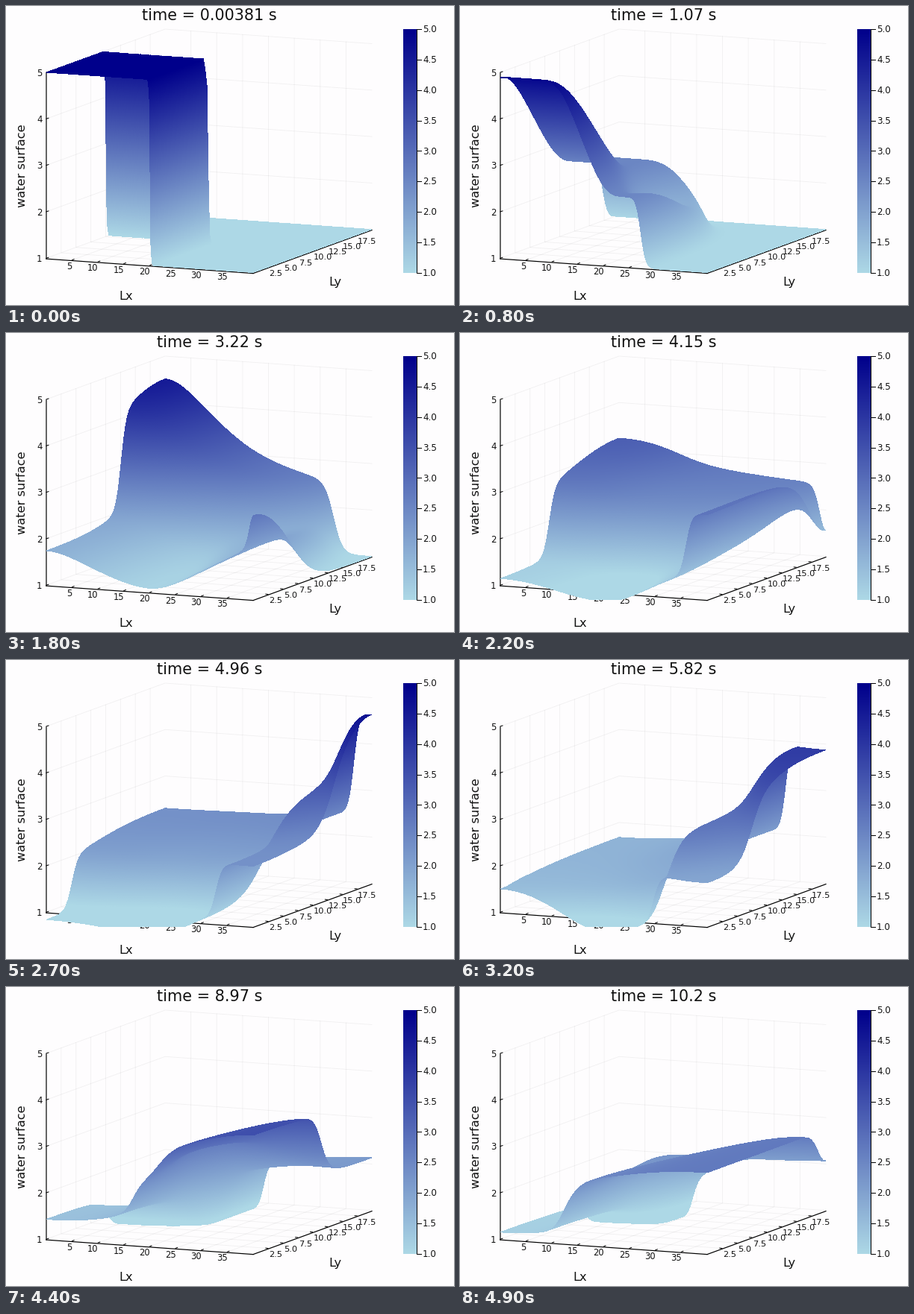
A matplotlib script that plays this animation: 600 by 401 pixels, repeating every 5000 ms.

```python
import numpy as np
import matplotlib.pyplot as plt
from matplotlib.animation import FuncAnimation
from matplotlib.colors import LinearSegmentedColormap

W, H, DPI = 600, 401, 64
PT = 72 / DPI
FRAMES, INTERVAL = 50, 100
LX, LY, CELL, CFL, G = 40, 20, 0.3125, 0.15, 9.81
CLIP_ROW = 358

plt.rcParams["font.family"] = "DejaVu Sans"
water = LinearSegmentedColormap.from_list("water", ["lightblue", "darkblue"], 512)


# --- shallow water: Lax-Friedrichs fluxes with one global speed, closed box ---
MIRROR = np.array([1, -1, 1])[:, None, None]


def max_speed(q):
    h, m, n = q
    return (np.maximum(np.abs(m), np.abs(n)) / h + np.sqrt(G * h)).max()


def flux_difference(q, speed):
    p = np.concatenate([q[:, :1] * MIRROR, q, q[:, -1:] * MIRROR], axis=1)
    h, m, n = p
    u = m / h
    f = np.array([m, m * u + G / 2 * h * h, n * u])
    face = 0.5 * (f[:, :-1] + f[:, 1:] - speed * (p[:, 1:] - p[:, :-1]))
    return face[:, 1:] - face[:, :-1]


def swap_axes(q):
    return q[[0, 2, 1]].transpose(0, 2, 1)


def simulate(end):
    nx, ny = int(LX / CELL), int(LY / CELL)
    q = np.zeros((3, nx, ny))
    q[0] = 1
    q[0, :nx // 2, :ny // 2] = 5
    times, heights = [0.0], [q[0].astype(np.float32)]
    while times[-1] < end:
        speed = max_speed(q)
        dt = CFL * CELL / speed
        change = flux_difference(q, speed) + swap_axes(flux_difference(swap_axes(q), speed))
        q = q - dt / CELL * change
        times.append(times[-1] + dt)
        heights.append(q[0].astype(np.float32))
    return np.array(times), heights


# Frames lie a fixed number of solver steps apart between the known times.
key_frames = [0, 8, 15, 22, 32, 39, 49]
key_times = [0.00381, 1.07, 2.54, 4.15, 5.82, 7.71, 10.2]
times, heights = simulate(key_times[-1])
step_ids = np.arange(len(times))
frame_steps = np.interp(np.arange(FRAMES), key_frames,
                        np.interp(key_times, times, step_ids))
frame_times = np.interp(frame_steps, step_ids, times)


# --- parallel projection ---
ORIGIN = np.array([54, 338.2])
X_STEP = np.array([277, 19.5]) / LX
Y_STEP = np.array([159, -58]) / LY
Z_STEP = 62.3


def project(x, y, z=1):
    px = ORIGIN[0] + x * X_STEP[0] + y * Y_STEP[0]
    py = ORIGIN[1] + x * X_STEP[1] + y * Y_STEP[1] - (z - 1) * Z_STEP
    return px, py


# One ray over the ground per pixel column, ordered from far to near.
SAMPLES = 180
cols = np.arange(54, 490)
reach = cols + 0.5 - ORIGIN[0]
y_far = np.minimum(LY, reach / Y_STEP[0])
y_near = np.maximum(0, (reach - LX * X_STEP[0]) / Y_STEP[0])
ray_y = y_far[:, None] + (y_near - y_far)[:, None] * np.linspace(0, 1, SAMPLES)
ray_x = (reach[:, None] - ray_y * Y_STEP[0]) / X_STEP[0]


def cell_weights(pos, length):
    n = int(length / CELL)
    c = np.clip(pos / CELL - 0.5, 0, n - 1)
    i = np.minimum(c.astype(int), n - 2)
    return i, c - i


ix, wx = cell_weights(ray_x, LX)
iy, wy = cell_weights(ray_y, LY)


def render(h):
    z = ((h[ix, iy] * (1 - wx) + h[ix + 1, iy] * wx) * (1 - wy)
         + (h[ix, iy + 1] * (1 - wx) + h[ix + 1, iy + 1] * wx) * wy)
    py = project(ray_x, ray_y, z)[1]
    y0, dy = py[:, :-1].ravel(), np.diff(py, axis=1).ravel()
    z0, dz = z[:, :-1].ravel(), np.diff(z, axis=1).ravel()
    count = np.ceil(np.abs(dy)).astype(int) + 1
    seg = np.repeat(np.arange(count.size), count)
    start = np.cumsum(count) - count
    s = (np.arange(seg.size) - start[seg]) / count[seg]
    row = np.floor(y0[seg] + s * dy[seg]).astype(int)
    col = cols[seg // (SAMPLES - 1)]
    ok = (row >= 0) & (row < CLIP_ROW)
    level = np.full((H, W), np.nan)
    level[row[ok], col[ok]] = (z0[seg] + s * dz[seg])[ok]  # nearest is written last
    return np.ma.masked_invalid(np.clip(level, 1, 5))


# --- stage ---
fig = plt.figure(figsize=(W / DPI, H / DPI), dpi=DPI, facecolor="#fefdfe")
ax = fig.add_axes([0, 0, 1, 1])
ax.axis("off")


def line(a, b, width=1.0, **kw):
    ax.plot([a[0], b[0]], [a[1], b[1]], color="black", lw=width * PT, **kw)


def axis_line(a, b):
    # Sits just under the surface's edge so that flat water leaves it visible.
    (x0, y0), (x1, y1) = project(*a), project(*b)
    line((x0, y0 + 0.9), (x1, y1 + 0.9), 1.2, snap=False)


def label(x, y, text, size=11.5, ha="center"):
    return ax.text(x, y + 0.365 * size, text, fontsize=size * PT, ha=ha,
                   va="baseline", color="#111111")


def grid(*points):
    px, py = zip(*(project(*p) for p in points))
    ax.plot(px, py, color="black", alpha=0.05, lw=0.9 * PT, zorder=1)


x_ticks = range(5, 40, 5)
y_ticks = np.arange(2.5, 20, 2.5)
z_ticks = range(1, 6)

for x in x_ticks:
    grid((x, 0, 1), (x, LY, 1), (x, LY, 5))
    px, py = project(x, 0)
    line((px, py), (px + 2.5, py - 1))
    label(px + 0.3, py + 8, str(x), ha="right")
for y in y_ticks:
    grid((LX, y, 1), (0, y, 1), (0, y, 5))
    px, py = project(LX, y)
    line((px, py), (px - 3, py - 0.3))
    label(px + 1, py + 7.5, f"{y:.1f}", 11.4, "left")
for z in z_ticks:
    grid((0, 0, z), (0, LY, z), (LX, LY, z))
    px, py = project(0, 0, z)
    line((px, py), (px + 3, py - 1))
    label(48.5, py + 0.5, str(z), 11.8, "right")

axis_line((0, 0, 5), (0, 0, 1))
axis_line((0, 0, 1), (LX, 0, 1))
axis_line((LX, 0, 1), (LX, LY, 1))

label(161, 388, "Lx", 16.3)
label(440.5, 369, "Ly", 16.3)
ax.text(22, 214, "water surface", fontsize=16.3 * PT, rotation=90,
        ha="center", va="center", color="#111111")
title = label(272.5, 11.3, "", 20.7)

ax.imshow(np.linspace(5, 1, 327)[:, None], cmap=water, vmin=1, vmax=5,
          extent=(532, 550, 358, 31), aspect="auto", interpolation="nearest")
line((550, 31), (550, 358))
for v in np.arange(1, 5.1, 0.5):
    py = 357.5 - (v - 1) * 81.6
    line((550, py), (556, py))
    label(558, py, f"{v:.1f}", 11.9, "left")

surface = ax.imshow(np.ma.masked_all((H, W)), cmap=water, vmin=1, vmax=5,
                    extent=(0, W, H, 0), aspect="auto",
                    interpolation="nearest", zorder=5)
ax.set(xlim=(0, W), ylim=(H, 0))


def update(frame):
    surface.set_data(render(heights[int(round(frame_steps[frame]))]))
    title.set_text(f"time = {frame_times[frame]:.3g} s")
    return surface, title


anim = FuncAnimation(fig, update, frames=FRAMES, interval=INTERVAL,
                     init_func=lambda: update(0), repeat=True, repeat_delay=0)
plt.show()
```
